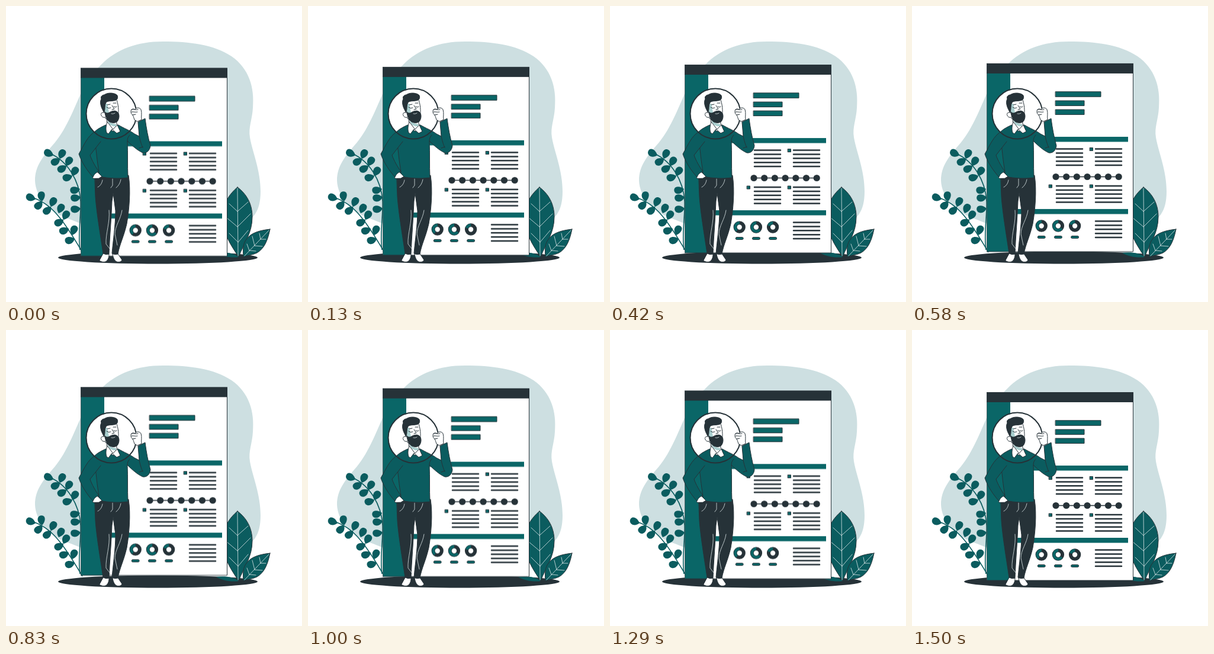
Write an HTML page that moves like this. It is 500 px wide and 500 px high and loops after 1540 ms.

```html
<!DOCTYPE html>
<html lang="en">
<head>
<meta charset="utf-8">
<title>Resume</title>
<style>
  html, body { margin: 0; height: 100%; overflow: hidden; background: #fff; }
  svg { display: block; width: 100vw; height: 100vh; }
  .teal { fill: #0a6667; }
  .deep { fill: #0b5c5f; }
  .dark { fill: #263238; }
  .white { fill: #fff; }
  .tint { fill: #a9cfcf; stroke: none; }
  .ink { stroke: #263238; stroke-width: 1; stroke-linejoin: round; stroke-linecap: round; }
  .line { fill: none; }
  .pale { fill: none; stroke: #dfe9ea; stroke-width: .8; stroke-linecap: round; stroke-linejoin: round; }
  .rows { fill: none; stroke: #263238; stroke-width: 2.5; stroke-linecap: round; }
  .stem { fill: none; stroke: #0b5c5f; stroke-width: 1.6; }

  /* Steady rise and fall, 37 held poses per loop */
  #page { animation: float 1540ms -5ms infinite; }
  @keyframes float {
    0% { transform: translateY(-.54px); animation-timing-function: steps(17, end); }
    45.946% { transform: translateY(-9.73px); animation-timing-function: step-end; }
    48.649% { transform: translateY(-9.73px); animation-timing-function: steps(18, end); }
    97.297%, 100% { transform: translateY(0); animation-timing-function: step-end; }
  }
</style>
</head>
<body>
<svg viewBox="0 0 500 500">
  <path fill="#cddfe1" d="M265 60C310 60 351 65 381 85C411 106 420 138 417 172C416 192 409 205 412 222C416 246 430 277 430 313C430 347 418 362 392 371C330 391 180 392 110 361C72 349 50 322 49 295C49 270 63 254 78 236C100 212 113 178 128 144C136 124 148 112 161 99C186 73 222 60 265 60Z"/>
  <ellipse class="dark" cx="256.500" cy="425" rx="168.500" ry="10.500"/>

  <g id="plant" class="deep">
    <path class="stem" d="M74 249C103 261 124 294 126 330C127 355 121 385 125 412"/>
    <path class="stem" d="M45 324C77 333 98 363 129 416"/>
  </g>

  <g class="deep">
    <path d="M394 424C384 417 370 415 355 417C365 423 380 426 394 424Z"/>
    <path class="ink" d="M391 306C407 318 416 335 416 356C416 384 402 400 393 424C380 404 367 386 366 358C365 335 377 318 391 306Z"/>
    <path class="ink" d="M446 377C442 397 436 410 424 417C416 421 409 420 401 424C400 411 400 402 406 394C414 383 428 379 446 377Z"/>
  </g>
  <path class="pale" d="M391 308L392 422M391 347L377 334M391 347L409 331M391 373L372 357M391 373L413 351M392 399L377 384M392 399L409 379M444 379L403 422M430 394L428 384M430 394L439 394M420 405L416 389M420 405L433 406M411 413L407 402M411 413L422 414"/>

  <g id="page">
    <rect class="white" x="126.500" y="105.500" width="247" height="317.500"/>
    <rect class="teal" x="126.500" y="121" width="39.500" height="302"/>
    <rect class="line ink" x="126.500" y="105.500" width="247" height="317.500"/>
    <rect class="dark ink" x="126.500" y="105.500" width="247" height="16"/>
    <g class="teal ink">
      <rect x="242.500" y="152.800" width="76.500" height="8.500"/>
      <rect x="242.500" y="168" width="48.500" height="8.500"/>
      <rect x="242.500" y="183" width="48.500" height="8.500"/>
    </g>
    <rect class="teal" x="176" y="229" width="189" height="8.500"/>
    <rect class="teal" x="176" y="351" width="189" height="8.500"/>
    <path class="line ink" style="stroke-width:1.6" d="M243 296.500H349"/>
  </g>

  <circle class="white" cx="178" cy="182" r="42"/>

  <g id="man" class="ink">
    <!-- trousers and shoes -->
    <path class="white" d="M165 417L174 419C174 425 172 430 168 432C164 433 160 432 158 430Z"/>
    <path class="white" d="M180 419L188 417L196 429C195 432 191 433 187 432C183 430 181 425 180 419Z"/>
    <path class="dark" d="M150 286L207 286C211 312 208 345 204 368C199 390 192 402 189 419Q184 421 179 418C181 395 185 370 185 346L181 316L179 330C178 360 175 390 174 419Q169 421 164 418C160 390 153 350 151 322Z"/>
    <path class="pale" d="M180 292V303L177 307M194 293C193 299 190 304 186 307M163 294C162 300 159 304 155 306M174 345C176 365 168 385 169 402L176 411M196 345C194 360 184 372 184 385L188 404"/>

    <!-- sweater -->
    <path class="deep" d="M149 213C155 207 162 204 168 201L190 201C198 206 211 211 217 216L225 220L223 196L235 190C237 206 240 222 244 236C243 244 238 249 231 248C222 244 213 236 205 228C206 249 205 269 206 290Q181 293 158 288L154 260Z"/>
    <path class="white" d="M147 291C145 286 148 281 153 279L162 288L157 291Z"/>
    <path class="deep" d="M149 213C138 220 132 234 123 250C128 265 138 279 147 289C149 284 152 281 157 280C151 271 145 261 142 252L160 229"/>
    <path class="line" d="M205 228C205 224 206 221 209 218M225 220C227 229 229 235 231 239M225 240L231 238"/>

    <!-- neck and collar -->
    <path class="white" d="M170 188L171 204L181 212L188 205L186 190Z"/>
    <path class="tint" d="M171 190C175 197 181 200 186 199L186 203C178 204 172 200 171 190Z"/>
    <path class="white" d="M171 196C169 202 168 208 170 214L173 216L179 208L187 215L193 212L188 201L181 208Z"/>

    <!-- head -->
    <path class="white" d="M164 163C163 174 165 185 169 191L189 188C191 177 190 166 186 156C178 155 170 156 164 163Z"/>
    <path class="tint" d="M166 165C165 173 165 180 168 183L174 180L171 165Z"/>
    <path class="white" d="M168 181C163 178 159 181 161 185C163 189 167 189 169 187Z"/>
    <path class="dark" d="M164 177C160 170 158 162 161 157C159 153 163 150 166 150C173 145 185 147 188 151C190 156 187 160 182 160C177 161 172 160 169 163C166 168 168 174 166 179Z"/>
    <path class="dark" d="M167 179C170 182 173 181 176 179C180 177 185 176 188 179C192 182 192 190 188 195C184 199 175 198 171 192C169 188 167 184 167 179Z"/>
    <path class="line" d="M170 171Q173 174 177 172M182 170Q184 172 187 170M171 167L176 166M181 164L186 164M179 168L183 174L179 175"/>
    <path class="pale" d="M178 182Q181 183 184 181"/>
  </g>

  <circle class="line ink" style="stroke-width:2" cx="178" cy="182" r="42.500"/>

  <g class="ink white">
    <path d="M217 192C216 189 215 186 214 184C211 183 210 177 212 175C214 173 217 174 218 175C220 171 226 171 228 175C230 181 228 187 229 192L222 195Z"/>
    <path class="line" d="M212 175C215 174 219 176 223 175M212 179C215 178 218 180 222 179M214 184L219 183"/>
  </g>
</svg>
<script>
  const page = document.getElementById('page');
  const plant = document.getElementById('plant');

  function add(parent, tag, attrs) {
    const el = document.createElementNS('http://www.w3.org/2000/svg', tag);
    for (const key in attrs) el.setAttribute(key, attrs[key]);
    parent.appendChild(el);
  }

  function paragraph(x, y) {
    let d = '';
    for (let i = 0; i < 5; i++) d += `M${x + 1} ${y + i * 6.9}h44`;
    add(page, 'path', { class: 'rows', d });
  }

  for (const x of [243, 309]) {
    for (const y of [249.500, 312]) {
      paragraph(x, y);
      add(page, 'rect', { class: 'teal ink', x: x - (x < 300 ? 11.5 : 8.5), y: y - 2, width: 5, height: 5 });
    }
  }
  paragraph(309, 371.500);

  for (let i = 0; i < 7; i++) {
    add(page, 'circle', { class: 'dark', cx: 243 + i * 17.700, cy: 296.500, r: 5.600 });
  }

  // Share of each ring shown in teal, counted back from the top
  [.4, .65, .2].forEach((share, i) => {
    const x = 218.700 + i * 28.200, y = 379.500, r = 7.200, len = 2 * Math.PI * r;
    const ring = { cx: x, cy: y, r, fill: 'none' };
    add(page, 'circle', { ...ring, stroke: '#263238', 'stroke-width': 6 });
    add(page, 'circle', {
      ...ring, stroke: '#0a6667', 'stroke-width': 4.400,
      'stroke-dasharray': `${share * len} ${len}`,
      transform: `rotate(${-90 - share * 360} ${x} ${y})`
    });
    add(page, 'rect', { class: 'teal ink', x: x - 6.500, y: 396.500, width: 13, height: 4, rx: 2 });
  });

  // Base point on the stem, then the direction of each leaf there
  const sprigs = [
    [80, 252, 205], [91, 258, 150, -65], [102, 270, 150, -60], [112, 287, 165, -60],
    [125, 309, 170], [126, 323, 175], [126, 342, 175],
    [50, 326, 200], [61, 330, 135, -95], [76, 339, 138, -65], [89, 350, -65],
    [97, 361, 152, -60], [106, 376, 160], [112, 387, -70], [116, 393, 165]
  ];
  for (const [x, y, ...angles] of sprigs) {
    for (const a of angles) {
      add(plant, 'path', {
        d: 'M0 0C3 -5 8 -8 13 -6C18 -4 18 3 14 5C9 7 4 4 0 0Z',
        transform: `translate(${x} ${y}) rotate(${a})`
      });
    }
  }
</script>
</body>
</html>
```
